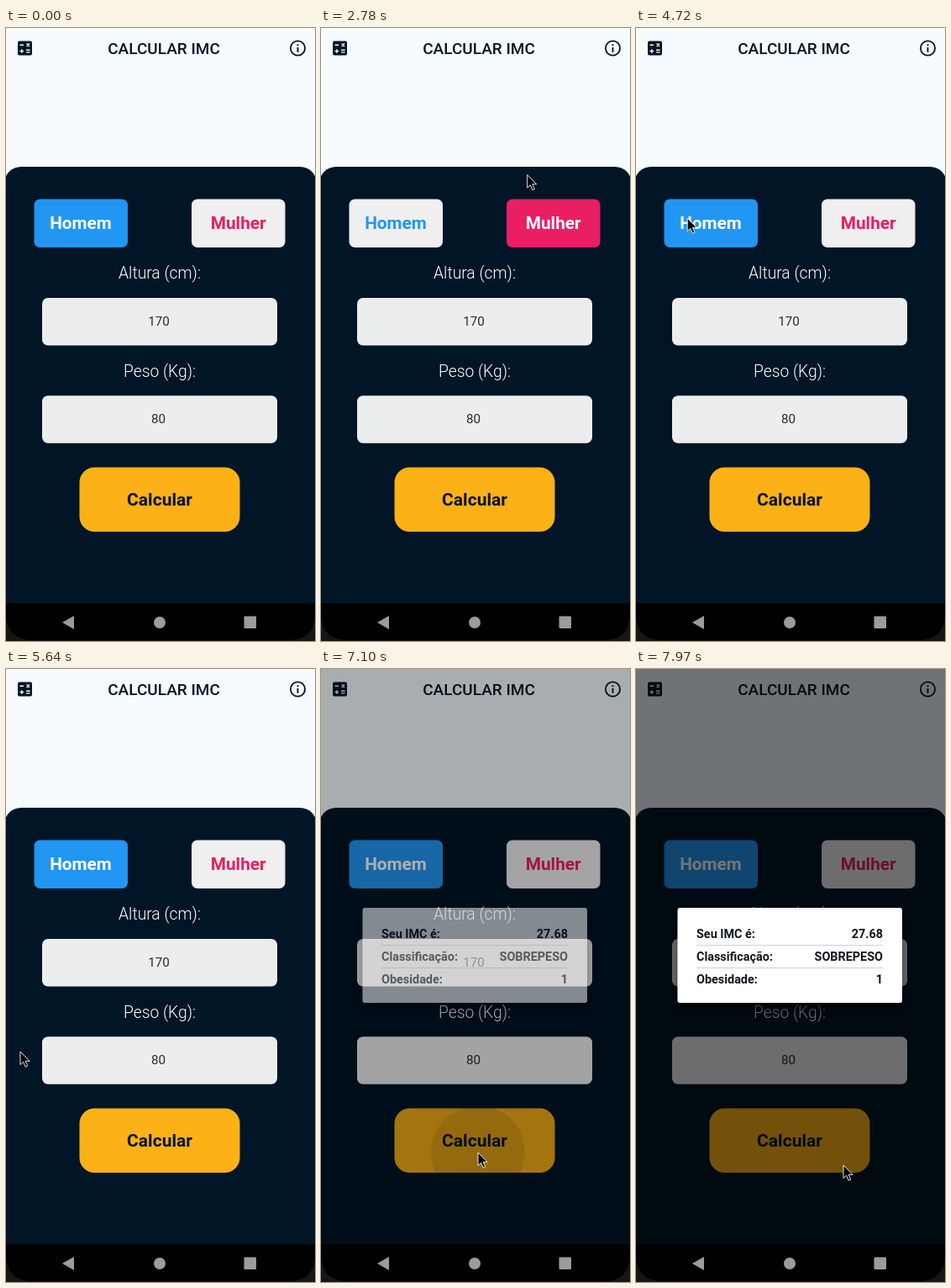
An HTML page that plays this animation: 368x729 px, repeating every 8000 ms.

```html
<!DOCTYPE html>
<html lang="pt">
<head>
<meta charset="utf-8">
<title>Calcular IMC</title>
<style>
  html, body { margin: 0; width: 100%; height: 100%; overflow: hidden; background: #161616; }
  svg { display: block; width: 100%; height: 100%; font-family: Roboto, sans-serif; }
  text { text-anchor: middle; fill: #001526; }
  .button { font-size: 20.8px; font-weight: 700; }
  .label { font-size: 19.3px; font-weight: 300; fill: #fff; }
  .value { font-size: 15.2px; fill: #2b2b30; }
  .result text { font-size: 14.4px; font-weight: 600; text-anchor: start; fill: #10171f; }
  .result .right { text-anchor: end; }
</style>
</head>
<body>
<svg viewBox="0 0 368 729">
  <defs>
    <clipPath id="manClip"><rect x="33.5" y="203.5" width="111.5" height="57.5" rx="7"/></clipPath>
    <clipPath id="womanClip"><rect x="221" y="203.5" width="111.5" height="57.5" rx="7"/></clipPath>
    <clipPath id="calcClip"><rect x="87.5" y="522.5" width="191" height="76.5" rx="18"/></clipPath>
    <filter id="shadow" x="-20%" y="-20%" width="140%" height="160%">
      <feDropShadow dx="0" dy="10" stdDeviation="6" flood-opacity=".5"/>
    </filter>
  </defs>

  <rect width="368" height="700" fill="#f5fbff"/>
  <rect x="-2" y="165" width="372" height="540" rx="20" fill="#001526"/>

  <rect x="14" y="15.5" width="17" height="17" rx="2" fill="#001526"/>
  <path d="M16.5 20.3h4.6M24.6 18.6l3.4 3.4m0-3.4l-3.4 3.4M16.5 27.5h4.6m-2.3-2.3v4.6M24 26.2h4.6M24 28.9h4.6"
        stroke="#f5fbff" stroke-width="1.4"/>
  <text x="188" y="31" font-size="19" font-weight="500">CALCULAR IMC</text>
  <circle cx="347.5" cy="24" r="8.6" fill="none" stroke="#001526" stroke-width="1.8"/>
  <path d="M347.5 19.2v2m0 1.8v5.8" stroke="#001526" stroke-width="1.9"/>

  <g clip-path="url(#manClip)">
    <rect id="manBox" x="33" y="203" width="113" height="59"/>
    <text id="manText" class="button" x="89" y="239">Homem</text>
    <circle id="manRipple" cx="62" cy="225" fill="#ffeb3b"/>
  </g>
  <g clip-path="url(#womanClip)">
    <rect id="womanBox" x="220" y="203" width="114" height="59"/>
    <text id="womanText" class="button" x="276.7" y="239">Mulher</text>
    <circle id="womanRipple" cx="267" cy="229" fill="#ffeb3b"/>
  </g>

  <text class="label" x="183" y="298">Altura (cm):</text>
  <rect x="43" y="321" width="280" height="56.5" rx="7" fill="#eceeed"/>
  <text class="value" x="182" y="353.5">170</text>
  <text class="label" x="183" y="415">Peso (Kg):</text>
  <rect x="43" y="437.3" width="280" height="56.5" rx="7" fill="#eceeed"/>
  <text class="value" x="181.5" y="470">80</text>

  <g clip-path="url(#calcClip)">
    <rect x="87" y="522" width="192" height="78" fill="#fcb116"/>
    <rect id="calcPress" x="87" y="522" width="192" height="78"/>
    <circle id="calcRipple" cx="187" cy="575"/>
    <text class="button" x="183" y="567.5" style="font-size:21px">Calcular</text>
  </g>

  <rect id="barrier" width="368" height="684"/>
  <g id="dialog" class="result">
    <rect x="49.5" y="284" width="267.5" height="113" rx="3" fill="#fff" filter="url(#shadow)"/>
    <path d="M72 328.5h222M72 355.5h222" stroke="#d0d0d0"/>
    <text x="72" y="320">Seu IMC é:</text><text class="right" x="294" y="320">27.68</text>
    <text x="72" y="347">Classificação:</text><text class="right" x="294" y="347">SOBREPESO</text>
    <text x="72" y="374">Obesidade:</text><text class="right" x="294" y="374">1</text>
  </g>

  <rect y="684" width="368" height="45" fill="#161616"/>
  <path d="M0 684H368V700Q366 727 338 728H30Q2 727 0 700Z"/>
  <g fill="#9c9c9c">
    <path d="M67 707L81 699V715Z"/>
    <circle cx="183" cy="707" r="7"/>
    <rect x="283.5" y="699.5" width="14.5" height="14.5" rx="1"/>
  </g>

  <path id="cursor" d="M0 0V15.5L3.6 12.3L6.2 18.2L8.7 17.1L6.2 11.3H11Z" stroke="#fff" stroke-width=".9"/>
</svg>
<script>
const LOOP = 8000, STEP = 77.1, FIRST_STEP = 995;
const BLUE = '#2196f3', PINK = '#e91e63', GREY = '#eeefee';

// Pointer stops: time, x, y
const route = [
  [990, 347, 149], [1320, 310, 190], [1766, 267, 228],
  [2470, 267, 228], [2850, 237, 160], [3308, 171, 115], [3770, 93, 136], [4156, 60, 224],
  [4650, 60, 224], [4850, 69, 250], [5467, 16, 403], [5621, 17, 455], [5930, 70, 535], [6320, 187, 575],
  [7580, 187, 575], [7930, 247, 590], [8000, 247, 590]
];

const $ = id => document.getElementById(id);
const clamp = v => Math.max(0, Math.min(1, v));
const set = (id, attributes) => {
  for (const name in attributes) $(id).setAttribute(name, attributes[name]);
};

// Monotone cubic interpolation of one coordinate along the route
const slope = (i, axis) => i < 0 || i > route.length - 2 ? 0
  : (route[i + 1][axis] - route[i][axis]) / (route[i + 1][0] - route[i][0]);

function tangent(i, axis) {
  const before = slope(i - 1, axis), after = slope(i, axis);
  return before * after > 0 ? 2 * before * after / (before + after) : 0;
}

function along(t, axis) {
  let i = 0;
  while (i < route.length - 2 && t >= route[i + 1][0]) i++;
  const a = route[i], b = route[i + 1], span = b[0] - a[0];
  const u = clamp((t - a[0]) / span), v = 1 - u;
  return v * v * (1 + 2 * u) * a[axis] + u * u * (1 + 2 * v) * b[axis]
    + span * u * v * (v * tangent(i, axis) - u * tangent(i + 1, axis));
}

function ripple(id, age, duration, strength) {
  const active = age >= 0 && age < duration;
  set(id, { r: active ? age * 0.65 : 0, opacity: active ? strength * (1 - age / duration) : 0 });
}

function choice(name, color, selected) {
  set(name + 'Box', { fill: selected ? color : GREY });
  $(name + 'Text').style.fill = selected ? '#fff' : color;
}

function draw(time) {
  const t = FIRST_STEP + STEP * Math.floor((time - FIRST_STEP) / STEP);

  const woman = t > 1990 && t < 4300;
  choice('man', BLUE, !woman);
  choice('woman', PINK, woman);
  ripple('womanRipple', t - 1903, 320, 0.65);
  ripple('manRipple', t - 4216, 165, 0.65);

  ripple('calcRipple', t - 7000, 230, 0.15);
  set('calcPress', { opacity: t > 6920 ? 0.05 * clamp((7240 - t) / 150) : 0 });

  const opening = clamp((t - 7040) / 150);
  set('barrier', { opacity: 0.54 * (1 - (1 - opening) ** 2.4) });
  set('dialog', { opacity: 1 - (1 - opening) ** 2 });

  set('cursor', {
    visibility: t > 990 ? 'visible' : 'hidden',
    transform: `translate(${along(t, 1)} ${along(t, 2)})`
  });
}

function tick() {
  draw(performance.now() % LOOP);
  requestAnimationFrame(tick);
}
tick();
</script>
</body>
</html>
```
